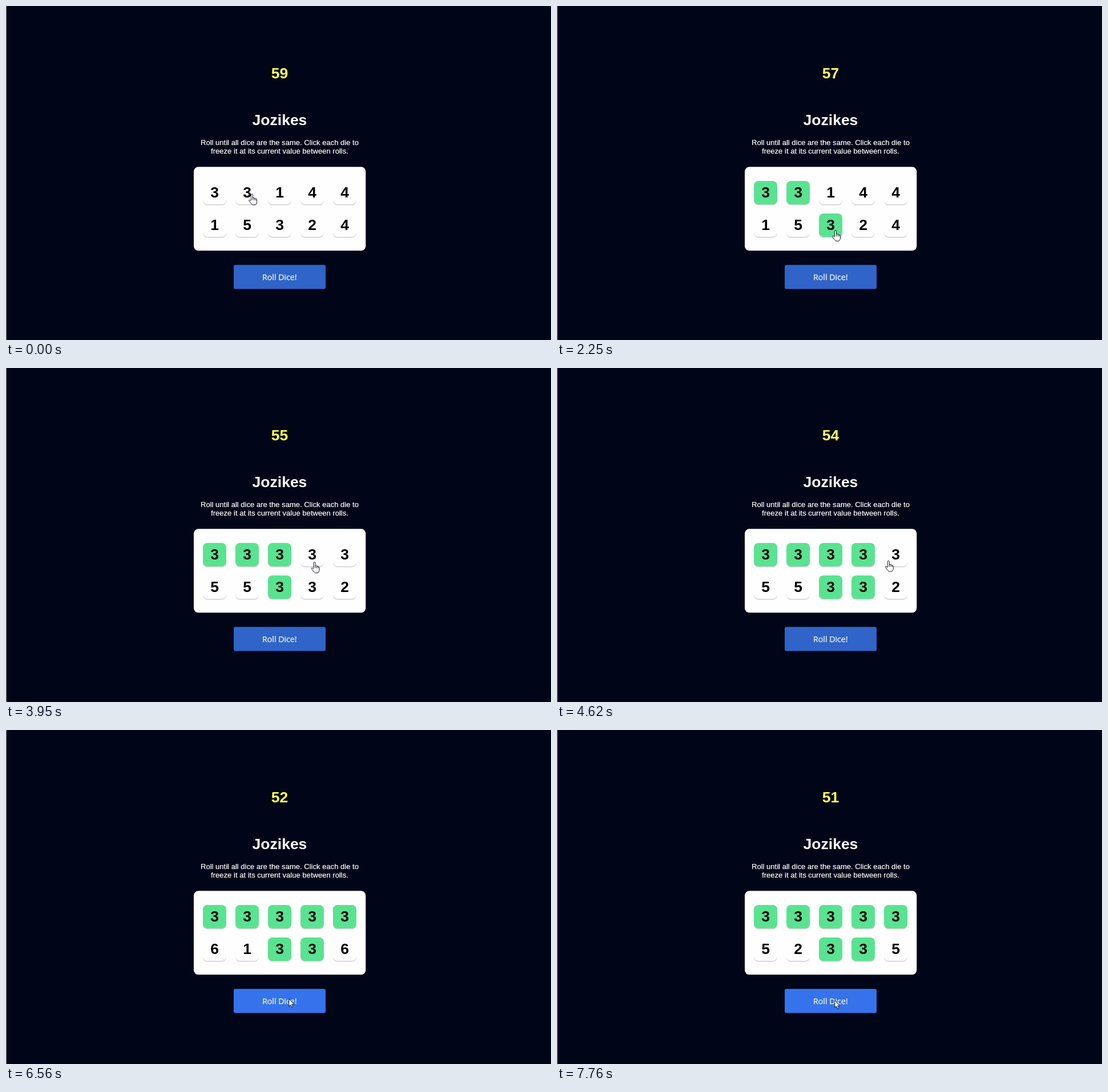
Recreate the animation shown at these times as an HTML page. Size 955x586 px, loop 8 s.

```html
<!DOCTYPE html>
<html lang="en">
<head>
<meta charset="utf-8">
<title>Dice game</title>
<style>
  html, body { margin: 0; width: 100%; height: 100%; overflow: hidden; background: #000618; }
  svg { display: block; width: 955px; height: 586px; }
  text { font-family: "Liberation Sans", Arial, sans-serif; text-anchor: middle; }
  .big { font-size: 26.5px; font-weight: bold; }
  .body { font-size: 13.06px; fill: #fff; stroke: #fff; stroke-width: .2; }
  .button { font: 14.2px "Open Sans", "Noto Sans", sans-serif; fill: #fff; stroke: #fff; stroke-width: .2; }
</style>
</head>
<body>
<svg id="stage" viewBox="0 0 955 586" xmlns="http://www.w3.org/2000/svg">
  <defs>
    <filter id="shadow" x="-20%" y="-20%" width="140%" height="140%" color-interpolation-filters="sRGB">
      <feDropShadow dx="0" dy="1.4" stdDeviation="0.6" flood-color="#000" flood-opacity="0.2"/>
    </filter>
  </defs>
  <rect width="955" height="586" fill="#000618"/>
  <rect width="1" height="586" fill="#85888e"/>
  <text id="counter" class="big" x="479.5" y="127" fill="#ffff57"></text>
  <text class="big" x="479.5" y="208.5" fill="#fff">Jozikes</text>
  <text class="body" x="479.5" y="244">Roll until all dice are the same. Click each die to</text>
  <text class="body" x="479.5" y="259">freeze it at its current value between rolls.</text>
  <rect x="329" y="282.3" width="301.3" height="147" rx="8" fill="#fefefe"/>
  <g id="dice"></g>
  <rect id="button" x="399" y="454.3" width="161" height="42.2" rx="3"/>
  <text class="button" x="479.3" y="481">Roll Dice!</text>
  <path id="hand" fill="#fff" stroke="#15151f" stroke-linejoin="round"
    d="M-1.5 11.5V2Q-1.5.5 0 .5T1.5 2V8Q1.5 6.8 2.8 6.8T4.2 8.2Q4.4 7.3 5.4 7.5T6.6 9Q6.8 8.4 7.6 8.6T8.5 10.2V14Q8.5 16.5 7 18L6 19.3H.5Q-2.5 16-5 12.5-5.8 11.3-4.8 10.7-3.6 10.2-1.5 12.8M1.5 8V11M4.2 8.2V11.2M6.6 9V11.4"/>
  <path id="arrow" fill="#fff" stroke="#000" stroke-width=".9"
    d="M.3 .3V13.3L3.2 10.7 5.1 15.2 7.2 14.3 5.3 9.9H9.4Z"/>
</svg>
<script>
const LOOP = 8000;
const SIZE = 41;
const PITCH = 57;
const IDLE = "#3064c8", HOVER = "#4f82eb", FOCUS = "#3573ed";
const FIRST_FACES = "3314415324";
const $ = id => document.getElementById(id);

// Each click freezes a die or, with new faces, rolls the dice.
const clicks = [
  { at: 250, x: 431, y: 329.5, die: 1 },
  { at: 1340, x: 378, y: 316, die: 0 },
  { at: 2250, x: 488, y: 393, die: 7 },
  { at: 2800, x: 502, y: 472, faces: "3333355332" },
  { at: 3600, x: 487, y: 342, die: 2 },
  { at: 4030, x: 541, y: 340, die: 3 },
  { at: 4400, x: 544, y: 376, die: 8 },
  { at: 4750, x: 594, y: 324, die: 4 },
  { at: 5850, x: 519, y: 475, faces: "3333361336" },
  { at: 6830, x: 493, y: 471, faces: "3333346333" },
  { at: 7750, x: 486.5, y: 474, faces: "3333352335" }
];

function add(parent, name, attributes) {
  const node = document.createElementNS("http://www.w3.org/2000/svg", name);
  for (const key in attributes) node.setAttribute(key, attributes[key]);
  return parent.appendChild(node);
}

const dice = Array.from({ length: 10 }, (_, i) => {
  const x = 345 + PITCH * (i % 5);
  const y = 307 + PITCH * Math.floor(i / 5);
  const face = add($("dice"), "rect",
    { x, y, width: SIZE, height: SIZE, rx: 8, filter: "url(#shadow)" });
  const label = add($("dice"), "text", { x: x + SIZE / 2, y: y + 29, class: "big" });
  return { face, label };
});

// The pointer rests after a click, then glides and arrives before the next one.
function pointerAt(time) {
  const to = clicks.find(c => c.at > time) ?? clicks.at(-1);
  const from = clicks.findLast(c => c.at <= time) ?? to;
  const part = (time - from.at) / (to.at - from.at || 1);
  const k = Math.min(1, Math.max(0, (part - 0.2) / 0.65));
  const ease = k * k * (3 - 2 * k);
  return { x: from.x + (to.x - from.x) * ease, y: from.y + (to.y - from.y) * ease };
}

function contains(shape, { x, y }) {
  const box = shape.getBBox();
  return x >= box.x && x <= box.x + box.width && y >= box.y && y <= box.y + box.height;
}

function draw(time) {
  const done = clicks.filter(c => c.at <= time);
  const faces = done.findLast(c => c.faces)?.faces ?? FIRST_FACES;
  const pointer = pointerAt(time);

  $("counter").textContent = 59 - Math.floor((time + 520) / 1000);
  dice.forEach(({ face, label }, i) => {
    face.setAttribute("fill", done.some(c => c.die === i) ? "#59e391" : "#fefefe");
    label.textContent = faces[i];
  });

  const focused = done.at(-1)?.faces;
  const hovered = contains($("button"), pointer);
  $("button").setAttribute("fill", !hovered ? IDLE : focused ? FOCUS : HOVER);

  const overDie = dice.some(({ face }) => contains(face, pointer));
  for (const [id, shown] of [["hand", overDie], ["arrow", !overDie]]) {
    $(id).setAttribute("transform", `translate(${pointer.x} ${pointer.y})`);
    $(id).setAttribute("visibility", shown ? "visible" : "hidden");
  }
}

const start = performance.now();
function tick() {
  draw((performance.now() - start) % LOOP);
  requestAnimationFrame(tick);
}
tick();
</script>
</body>
</html>
```
